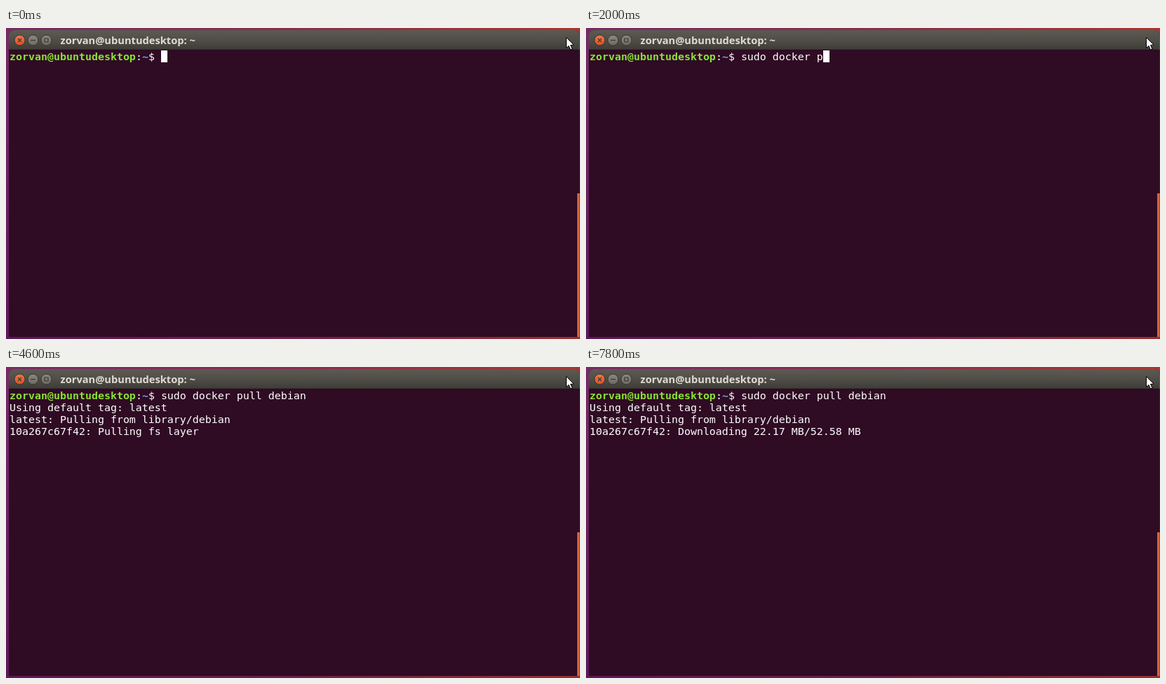
Animation, 818 px wide and 444 px high, one loop 8000 ms. Source, as an HTML page with a canvas:

```html
<!DOCTYPE html>
<html lang="en">
<head>
<meta charset="utf-8">
<title>Terminal</title>
<style>
  html, body { margin: 0; width: 100%; height: 100%; overflow: hidden; background: #2f0b24; }
  #stage { position: relative; width: 818px; height: 444px; overflow: hidden; }
  canvas { position: absolute; left: 0; top: 0; }
  #title {
    position: absolute; left: 77.5px; top: 7px; white-space: pre;
    font: bold 14.67px/21px "Open Sans", "Noto Sans", sans-serif; color: #dfdbd2;
  }
  #term {
    position: absolute; left: 5px; top: 33px; margin: 0; color: #fff;
    font: 14.95px/17px "DejaVu Sans Mono", monospace; white-space: pre;
    font-variant-ligatures: none;
  }
  #term b { color: #8ae234; }
  #term i { color: #729fcf; font-style: normal; font-weight: bold; }
  #caret { position: absolute; top: 32px; width: 9px; height: 17px; background: #fff; }
</style>
</head>
<body>
<div id="stage">
  <canvas id="view" width="818" height="444"></canvas>
  <div id="title"></div>
  <pre id="term"><b id="user"></b>:<i>~</i>$ <span id="cmd"></span>
<span id="out"></span></pre>
  <div id="caret"></div>
  <canvas id="pointer" width="818" height="444"></canvas>
</div>
<script>
const LOOP = 8000, STEP = 200;
const CELL = 9, LEFT = 5, PROMPT = 24;
const USER = 'zorvan@ubuntudesktop';
const COMMAND = 'sudo docker pull debian';
const LAYER = '10a267c67f42: ';
const $ = id => document.getElementById(id);

function gradient(g, x0, y0, x1, y1, ...colors) {
  const fill = g.createLinearGradient(x0, y0, x1, y1);
  colors.forEach((c, i) => fill.addColorStop(i / (colors.length - 1), c));
  return fill;
}

function box(g, x, y, w, h, fill) {
  g.fillStyle = fill;
  g.fillRect(x, y, w, h);
}

function button(g, x, fill, drawMark) {
  const y = 17.5;
  g.beginPath();
  g.arc(x, y, 7.5, 0, Math.PI * 2);
  g.fillStyle = fill;
  g.fill();
  g.lineWidth = 1;
  g.strokeStyle = '#35342f';
  g.stroke();
  g.beginPath();
  drawMark(x, y);
  g.lineWidth = 1.2;
  g.strokeStyle = '#3a3831';
  g.stroke();
}

function drawWindow() {
  const g = $('view').getContext('2d');
  // wallpaper showing around the window
  box(g, 0, 0, 818, 444, gradient(g, 0, 0, 818, 0, '#782b63', '#8c2c4f', '#ad352f'));
  box(g, 0, 3, 4, 441, gradient(g, 0, 3, 0, 444, '#752b66', '#5c1a58'));
  box(g, 0, 441, 818, 3, gradient(g, 0, 0, 818, 0, '#5c1a58', '#6d2049', '#97302f'));

  g.beginPath();
  g.roundRect(4, 3, 813, 438, [7, 7, 0, 0]);
  g.fillStyle = '#2f0b24';
  g.fill();
  g.beginPath();
  g.roundRect(4, 3, 813, 28, [7, 7, 0, 0]);
  g.fillStyle = gradient(g, 0, 3, 0, 31, '#5c5a51', '#504e47', '#3d3c37');
  g.fill();
  box(g, 4, 30, 813, 1, '#35322e');

  // scrollbar
  box(g, 814, 236, 3, 205, '#d9623a');
  box(g, 817, 236, 1, 205, '#a04a30');
  box(g, 817, 31, 1, 205, '#4e1c20');

  button(g, 19.5, gradient(g, 0, 10, 0, 25, '#f0764d', '#dd4f22'), (x, y) => {
    g.moveTo(x - 2.5, y - 2.5); g.lineTo(x + 2.5, y + 2.5);
    g.moveTo(x + 2.5, y - 2.5); g.lineTo(x - 2.5, y + 2.5);
  });
  const grey = gradient(g, 0, 10, 0, 25, '#8b897f', '#6c6a62');
  button(g, 38.5, grey, (x, y) => { g.moveTo(x - 3.5, y); g.lineTo(x + 3.5, y); });
  button(g, 57.5, grey, (x, y) => g.rect(x - 2.5, y - 2.5, 5, 5));
}

function drawPointer() {
  const g = $('pointer').getContext('2d');
  g.translate(798.5, 13.5);
  g.beginPath();
  g.moveTo(0, 0);
  g.lineTo(0, 15);
  g.lineTo(3.5, 12);
  g.lineTo(6, 17.5);
  g.lineTo(8.5, 16.5);
  g.lineTo(6, 11);
  g.lineTo(10.5, 10.5);
  g.closePath();
  g.fillStyle = '#fff';
  g.fill();
  g.strokeStyle = '#000';
  g.stroke();
}

// chunks of 540.672 kB arrive a little faster in the second stretch
function progress(t) {
  const n = t < 6600 ? 1 + 17 * (t - 5600) / 1000 : 18 + 23 * (t - 6600) / 1200;
  const kb = 539.9 + 540.672 * (Math.floor(n + 1e-6) - 1);
  const [amount, unit] = kb < 1000 ? [kb, 'kB'] : [kb / 1000, 'MB'];
  return `${+amount.toPrecision(4)} ${unit}`;
}

function output(t) {
  const lines = [];
  if (t >= 3800) lines.push('Using default tag: latest');
  if (t >= 4600) {
    lines.push('latest: Pulling from library/debian');
    lines.push(LAYER + (t < 5600 ? 'Pulling fs layer' : `Downloading ${progress(t)}/52.58 MB`));
  }
  return lines.join('\n');
}

function setText(id, text) {
  if ($(id).textContent !== text) $(id).textContent = text;
}

function draw(time) {
  const t = Math.floor((time % LOOP) / STEP) * STEP;
  const typed = Math.min(COMMAND.length, Math.floor(t / 150));
  setText('cmd', COMMAND.slice(0, typed));
  setText('out', output(t));
  $('caret').style.left = LEFT + CELL * (PROMPT + typed) + 'px';
  $('caret').style.visibility = t < 3800 ? 'visible' : 'hidden';
}

let start;
function tick(now) {
  start ??= now;
  draw(now - start);
  requestAnimationFrame(tick);
}

setText('title', USER + ': ~');
setText('user', USER);
drawWindow();
drawPointer();
requestAnimationFrame(tick);
</script>
</body>
</html>
```
